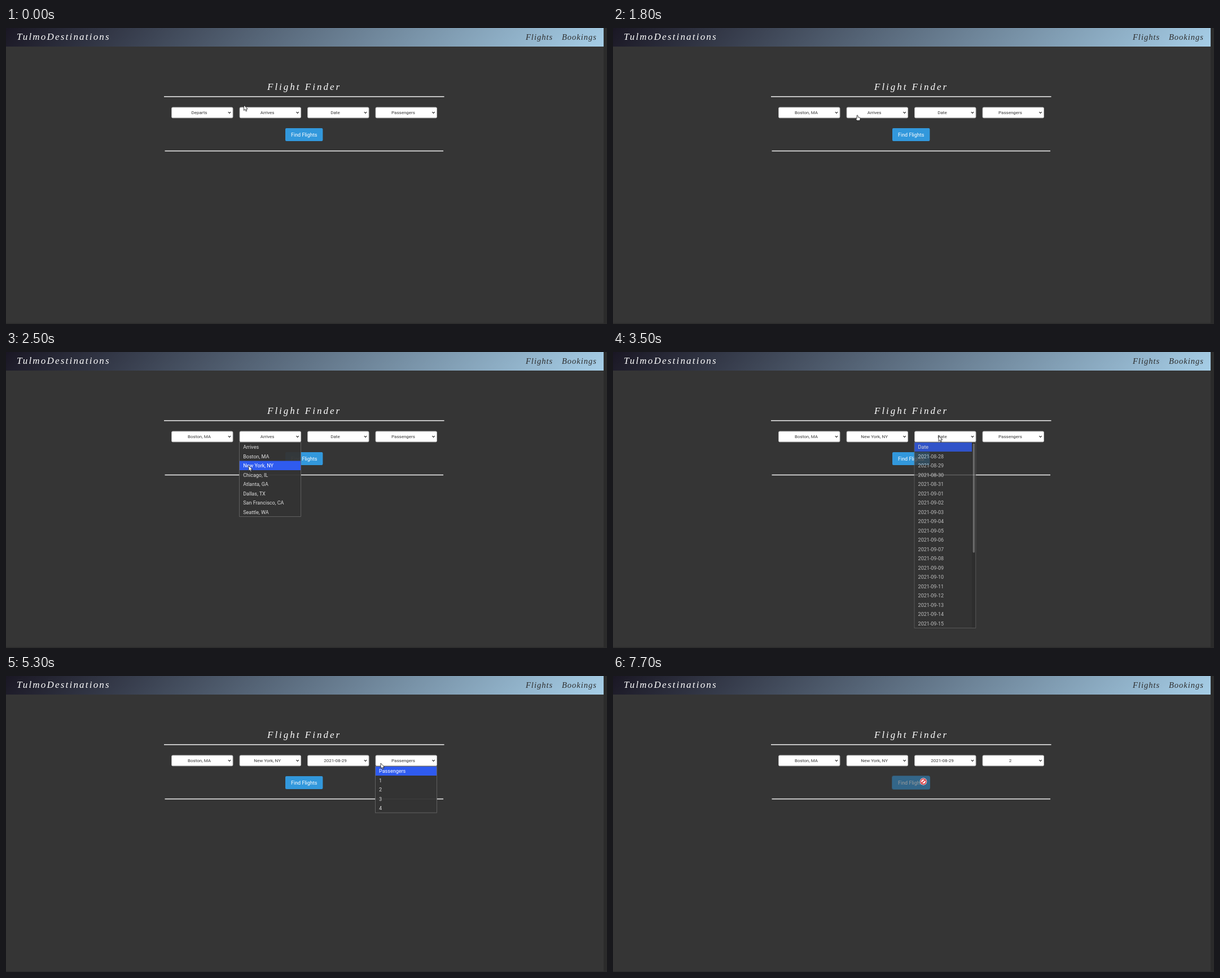
Animation, 1065 px wide and 526 px high, one loop 8 s. Source, as an HTML page:

```html
<!DOCTYPE html>
<html lang="en">
<head>
<meta charset="utf-8">
<title>Flight Finder</title>
<style>
  html, body { margin: 0; width: 100%; height: 100%; overflow: hidden; background: #353535; }
  svg { display: block; width: 100%; height: 100%; font-family: Roboto, sans-serif; }
  .script { font-family: "Liberation Serif", serif; font-style: italic; }
  .mid { text-anchor: middle; }
</style>
</head>
<body>
<svg viewBox="0 0 1065 526">
  <defs>
    <linearGradient id="sky" gradientUnits="userSpaceOnUse" x1="256.5" y1="-256.5" x2="802.5" y2="289.5">
      <stop stop-color="#1a1724"/>
      <stop offset="1" stop-color="#a6cee7"/>
    </linearGradient>
  </defs>
  <rect width="1065" height="526" fill="#353535"/>
  <rect y="524" width="1059" height="2" fill="#2e2e2e"/>
  <rect width="1059" height="33" fill="url(#sky)"/>
  <rect x="1059" width="6" height="526" fill="#2b2b2b"/>
  <g class="script">
    <text x="19" y="21" font-size="17" letter-spacing="2.2" fill="#fff">TulmoDestinations</text>
    <g font-size="14.5" letter-spacing="1" fill="#2d2d2d">
      <text x="921" y="20.5">Flights</text>
      <text x="985" y="20.5">Bookings</text>
    </g>
    <text x="463" y="110" font-size="17" letter-spacing="3" fill="#fff">Flight Finder</text>
  </g>
  <path d="M280 122H776.5M281.5 218.5H775" stroke="#f2f2f2" stroke-width="1.4"/>
  <g id="scene"></g>
</svg>
<script>
const LOOP = 8000, STEP = 100, ROW = 16.5, LIST_TOP = 160.5;
const scene = document.getElementById('scene');

const cities = ['Boston, MA', 'New York, NY', 'Chicago, IL', 'Atlanta, GA',
  'Dallas, TX', 'San Francisco, CA', 'Seattle, WA'];
const dates = Array.from({ length: 19 }, (_, i) =>
  new Date(Date.UTC(2021, 7, 28 + i)).toISOString().slice(0, 10));

// Each list is open from `open` to `close` and fully opaque from `solid`.
const fields = [
  { x: 293, options: ['Departs', ...cities], pick: 1, open: 500, solid: 600, close: 1400 },
  { x: 413.6, options: ['Arrives', ...cities], pick: 2, open: 1900, solid: 2000, close: 3200 },
  { x: 534, options: ['Date', ...dates], pick: 2, open: 3500, solid: 3900, close: 4900, scrolls: true },
  { x: 654.5, options: ['Passengers', 1, 2, 3, 4], pick: 2, open: 5300, solid: 5300, close: 6000 }
];

// start, end, x, y, pointer shape on arrival
const moves = [
  [0, 0, 421.5, 137, 'arrow'],
  [200, 200, 396, 150, 'hand'],
  [500, 500, 396, 150, 'arrow'],
  [700, 1100, 382, 186, 'arrow'],
  [1400, 1700, 433, 155, 'hand'],
  [1900, 1900, 433, 155, 'arrow'],
  [2100, 2500, 430, 202, 'arrow'],
  [3200, 3200, 577, 149, 'hand'],
  [3500, 3500, 577, 149, 'arrow'],
  [4200, 4200, 573, 197, 'arrow'],
  [4900, 4900, 664, 155, 'hand'],
  [5300, 5300, 664, 155, 'arrow'],
  [5700, 5700, 678, 226, 'arrow'],
  [6000, 6000, 681, 206, 'arrow'],
  [6400, 6400, 552, 187, 'hand'],
  [6700, 6700, 550, 187, 'hand'],
  [7700, 7700, 550, 187.5, 'blocked']
];

const shapes = {
  arrow: `<path d="M0 0V9.5L2.2 7.5L3.7 11L5.3 10.3L3.8 7H6.8Z" fill="#fff" stroke="#111" stroke-width=".8"/>`,
  hand: `<path d="M-1 .6Q0 -1 1 .6V3.4L4.4 4.2Q5.4 4.6 5.2 6L4.4 9.5H-.6L-3 6Q-2.6 4.8 -1 6Z"
    fill="#fff" stroke="#111" stroke-width=".8"/>`,
  blocked: `<circle r="6.2" fill="#fff"/><circle r="4.7" fill="#fff" stroke="#d8343c" stroke-width="1.7"/>
    <path d="M-3.2 3.2L3.2 -3.2" stroke="#d8343c" stroke-width="1.7"/>`
};

function cursorAt(t) {
  const i = moves.findLastIndex(move => move[0] <= t);
  const [start, end, x, y, shape] = moves[i];
  if (t >= end) return { x, y, shape };
  const [, , fromX, fromY] = moves[i - 1];
  const u = (t - start) / (end - start);
  return { x: fromX + (x - fromX) * u, y: fromY + (y - fromY) * u, shape: 'arrow' };
}

function select({ x, options, pick, close }, t) {
  return `<g transform="translate(${x} 0)">
    <rect x=".5" y="141" width="108.5" height="18.8" rx="2" fill="#fff" stroke="#b5b5b5"/>
    <text class="mid" x="49.5" y="153" font-size="8" fill="#363636">${options[t < close ? 0 : pick]}</text>
    <path d="M100.8 149.2l2.2 2.2l2.2 -2.2" fill="none" stroke="#222" stroke-width="1.1"/>
  </g>`;
}

function list({ x, options, open, solid, close, scrolls }, t, cursor) {
  if (t < open || t >= close) return '';
  const active = Math.max(0, Math.floor((cursor.y - LIST_TOP) / ROW));
  const height = options.length * ROW;
  const rows = options.map((label, i) =>
    `<text x="6.6" y="${i * ROW + 11.6}" fill="${i === active ? '#fff' : '#dedede'}">${label}</text>`);
  const bar = `<rect x="102" width="6.5" height="${height}" fill="#2d2d2d"/>
    <rect x="103.6" y="2" width="3.4" height="194" rx="1.5" fill="${t < 4200 ? '#777' : '#8a8a8a'}"/>`;
  return `<g transform="translate(${x} ${LIST_TOP})" font-size="9" opacity="${t < solid ? .8 : 1}">
    <rect width="108.8" height="${height}" fill="#333" fill-opacity=".95"/>
    <rect y="${active * ROW}" width="${scrolls ? 102 : 108.8}" height="${ROW}" fill="#2f5bef"/>
    ${scrolls ? bar : ''}${rows.join('')}
    <rect width="108.8" height="${height}" fill="none" stroke="#6b6b6b" stroke-width=".8"/>
  </g>`;
}

function button(t) {
  const disabled = t >= 7700;
  const ring = `<rect x="494.5" y="177.5" width="67" height="24" rx="2.5" fill="none" stroke="#3298dc" stroke-opacity=".35"/>`;
  return `<g opacity="${disabled ? .5 : 1}">
    <rect x="495" y="178" width="66.4" height="23" rx="2" fill="${t >= 6400 && !disabled ? '#2f96db' : '#3298dc'}"/>
    <text class="mid" x="528.2" y="193" font-size="9" fill="#fff">Find Flights</text>
  </g>${disabled ? ring : ''}`;
}

function render(t) {
  const cursor = cursorAt(t);
  scene.innerHTML = fields.map(field => select(field, t)).join('') + button(t) +
    fields.map(field => list(field, t, cursor)).join('') +
    `<g transform="translate(${cursor.x} ${cursor.y})">${shapes[cursor.shape]}</g>`;
}

const began = performance.now();
let shown = -1;
function tick() {
  const t = Math.floor((performance.now() - began) % LOOP / STEP) * STEP;
  if (t !== shown) render(shown = t);
  requestAnimationFrame(tick);
}
tick();
</script>
</body>
</html>
```
